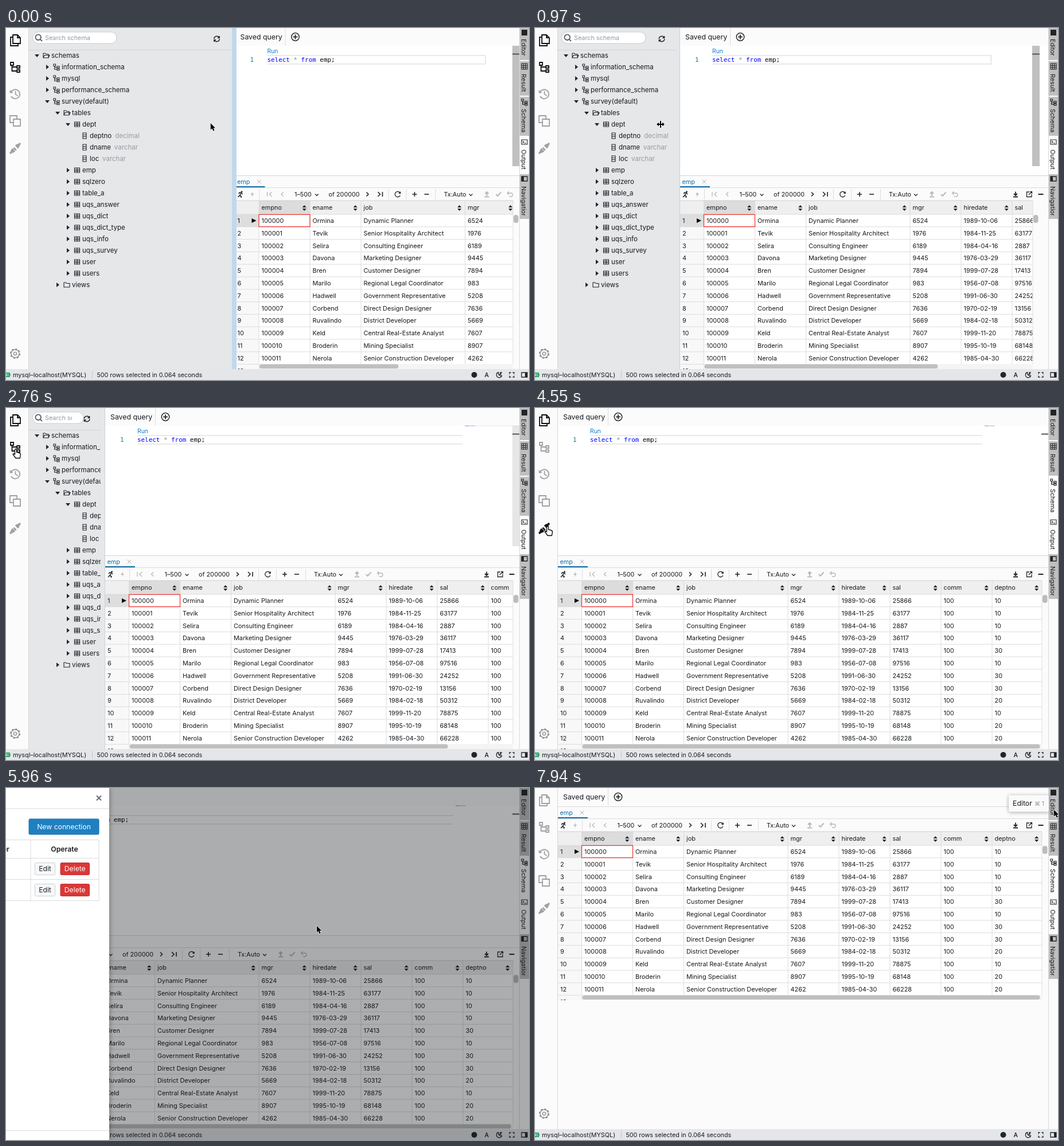
Recreate the animation shown at these times as an HTML page. Size 912 by 614 pixels, loop 8000 ms.

```html
<!DOCTYPE html>
<html lang="en">
<head>
<meta charset="utf-8">
<title>Database workbench</title>
<style>
html, body { margin: 0; width: 100%; height: 100%; overflow: hidden; background: #fbfbfb; }
svg { display: block; width: 912px; height: 614px; }
text { font-family: Inter, "Open Sans", sans-serif; white-space: pre; fill: #16191d; }
.mono { font-family: "DejaVu Sans Mono", monospace; }
</style>
</head>
<body>
<svg id="stage" viewBox="0 0 912 614"></svg>
<script>
const stage = document.getElementById('stage');
const INK = '#20252a', GREY = '#a0a0a0', LINE = '#dcdcdc', PANEL = '#e5e7e9';

const set = (e, a) => { for (const k in a) e.setAttribute(k, a[k]); return e; };
function el(p, tag, a = {}) {
  const e = set(document.createElementNS('http://www.w3.org/2000/svg', tag), a);
  p.append(e);
  return e;
}
const group = (p, a) => el(p, 'g', a);
const rect = (p, x, y, width, height, fill, a) => el(p, 'rect', { x, y, width, height, fill, ...a });
const move = (e, x, y) => set(e, { transform: `translate(${x} ${y})` });
const show = (e, on) => set(e, { visibility: on ? 'visible' : 'hidden' });
function text(p, x, y, s, size, a) {
  const e = el(p, 'text', { x, y, 'font-size': size, ...a });
  e.textContent = s;
  return e;
}
const icon = (p, x, y, d, a) => el(p, 'path', {
  d, transform: `translate(${x} ${y})`, fill: 'none', stroke: INK, 'stroke-width': 1.3, ...a });
const solid = (p, x, y, d, fill = INK) => icon(p, x, y, d, { fill, stroke: 'none' });
const vline = (p, x, y1, y2, stroke = LINE) => icon(p, x, 0, `M0 ${y1}V${y2}`, { stroke, 'stroke-width': 1 });
const hline = (p, x1, x2, y, stroke = LINE) => icon(p, 0, y, `M${x1} 0H${x2}`, { stroke, 'stroke-width': 1 });
const defs = el(stage, 'defs');
function clip(id, x, y, w, h) {
  return rect(el(defs, 'clipPath', { id }), x, y, w, h, '#000');
}
const clipped = (p, id) => group(p, { 'clip-path': `url(#${id})` });

const TREE = 'M-5-5h3.5v3.5h-3.5zM-3.3-1V4.2H.5M-3.3 1H.5M1-1.2h4v2.8h-4zM1 3.2h4v2.6h-4z';
const TABLE = 'M-4.5-4h9v8h-9zM-4.5-1.2h9M-4.5 1.4h9M0-4V4';
const FOLDER = 'M-5 4V-4h3.5l1.3 1.5H4V4zM-5 4L-3-.5H6L4 4';
const DB = 'M-5-6Q0-9 5-6V6Q0 9-5 6ZM-5-6Q0-3 5-6M-5-1.5Q0 1 5-1.5M-5 3Q0 5.5 5 3';
const SYNC = 'M4.3-2A4.8 4.8 0 0 0-4.8 0M-4.3 2A4.8 4.8 0 0 0 4.8 0M4.6-5v3.2H1.4M-4.6 5V1.8h3.2';
const RELOAD = 'M4.3-1.8A4.7 4.7 0 1 0 4.3 1.9M4.7-4.6V-1.6H1.7';
const CHEVRON = 'M-3-1.6L0 1.5 3-1.6';
const CROSS = 'M-3.3-3.3L3.3 3.3M3.3-3.3L-3.3 3.3';

rect(stage, 0, 0, 912, 614, '#fbfbfb');

// editor
const editor = group(stage);
rect(editor, 0, 31, 900, 226, '#fff');
text(editor, 9, 20, 'Saved query', 12.3);
vline(editor, 87.5, 0, 31);
el(editor, 'circle', { cx: 105, cy: 15.5, r: 6.8, fill: 'none', stroke: '#111', 'stroke-width': 1.3 });
icon(editor, 105, 15.5, 'M-4 0H4M0-4V4', { stroke: '#111', 'stroke-width': 1.6 });
text(editor, 56, 44, 'Run', 10.4, { style: 'fill:#0f7dc9' });
text(editor, 26, 59, '1', 10.9, { class: 'mono', style: 'fill:#237893' });
const code = text(editor, 56, 59, '', 10.9, { class: 'mono' });
[['select ', '#00f'], ['* ', '#778899'], ['from ', '#00f'], ['emp;', '#000']].forEach(([s, c]) => {
  el(code, 'tspan', { style: `fill:${c}` }).textContent = s;
});
const current = icon(stage, 0, 0, '', { stroke: '#e2e2e2', 'stroke-width': 1.5 });
const minimap = group(stage);
rect(minimap, 0, 30.5, 8, 1.2, '#8ca4f0');
rect(minimap, 9, 30.5, 9, 1.2, '#a9bbe8');
const trail = rect(minimap, 18, 30.5, 82, 1.2, '#bcd3f2');
const edge = group(stage);
const slider = rect(edge, 883, 31, 13, 210, '#c0c0c0');
rect(edge, 883, 44.5, 13, 2, '#555');

// results
const results = group(stage);
rect(results, 0, 257, 900, 338, '#fbfbfb');
hline(results, 0, 900, 257.5, '#d5d5d5');
text(results, 3.5, 272, 'emp', 10.8, { style: 'fill:#106ba3' });
icon(results, 42, 268, CROSS, { stroke: '#aaa', 'stroke-width': 1 });
hline(results, 0, 900, 278.5);
rect(results, 0, 276, 52, 2, '#106ba3');
const bar = group(results, { transform: 'translate(0 290)' });
icon(bar, 9, 0, 'M1-1L-1 2 2 4 1 6M-1 2L-4 5M-3-1L-1-3 2-2 4 0', { 'stroke-width': 1.6 });
el(bar, 'circle', { cx: 11.5, cy: -4.2, r: 1.5, fill: INK });
solid(bar, 30, 0, 'M1-5L-3 1H0L-1 5 3-1H0Z', '#bbb');
icon(bar, 60, 0, 'M-4-4V4M4-4L0 0 4 4', { stroke: '#b5b5b5' });
icon(bar, 82, 0, 'M2-3.5L-1.5 0 2 3.5', { stroke: '#b5b5b5' });
text(bar, 103.5, 4, '1–500', 10.8);
icon(bar, 142.5, 1, CHEVRON);
text(bar, 163, 3.7, 'of 200000', 10.8);
icon(bar, 231, 0, 'M-2-3.5L1.5 0-2 3.5', { 'stroke-width': 1.6 });
icon(bar, 253, 0, 'M4-4V4M-4-4L0 0-4 4', { 'stroke-width': 1.6 });
icon(bar, 283.5, 0, RELOAD);
icon(bar, 313, 0, 'M-4 0H4M0-4V4', { 'stroke-width': 1.6 });
icon(bar, 334, 0, 'M-4 0H4', { 'stroke-width': 1.6 });
[42, 267, 298, 349].forEach(x => vline(bar, x + .5, -9, 9));
text(bar, 364, 4, 'Tx:Auto', 10.8);
icon(bar, 411, 1, CHEVRON);
icon(bar, 439, 0, 'M0 3V-3M-3-1L0-4 3-1M-4 4.5H4', { stroke: '#b8b8b8', 'stroke-width': 2 });
icon(bar, 459, 0, 'M-4 0L-1.3 3 4.5-3.5', { stroke: '#b8b8b8', 'stroke-width': 2 });
icon(bar, 479, 0, 'M-4-2H2A3 3 0 0 1 2 4H-1M-1.5-5L-4.5-2-1.5 1', { stroke: '#b8b8b8' });

const COLS = 'empno ename job mgr hiredate sal comm deptno'.split(' ');
const STARTS = [41.5, 130.5, 219.5, 401, 490, 579, 668, 757, 844.5];
const ROWS = `Ormina,Dynamic Planner,6524,1989-10-06,25866,10
Tevik,Senior Hospitality Architect,1976,1984-11-25,63177,10
Selira,Consulting Engineer,6189,1984-04-16,2887,10
Davona,Marketing Designer,9445,1976-03-29,36117,10
Bren,Customer Designer,7894,1999-07-28,17413,30
Marilo,Regional Legal Coordinator,983,1956-07-08,97516,10
Hadwell,Government Representative,5208,1991-06-30,24252,30
Corbend,Direct Design Designer,7636,1970-02-19,13156,30
Ruvalindo,District Developer,5669,1984-02-18,50312,20
Keld,Central Real-Estate Analyst,7607,1999-11-20,78875,10
Broderin,Mining Specialist,8907,1995-10-19,68148,20
Nerola,Senior Construction Developer,4262,1985-04-30,66228,20`.split('\n');
const PITCH = 21.8, TOP = 325, CELL = 10.9;

const gridClip = clip('grid', 0, 300, 800, 295);
const grid = clipped(results, 'grid');
rect(grid, 0, 301, 860, 294, '#fff');
rect(grid, 0, 301, 844.5, 24, '#efefef');
rect(grid, 41.5, 301, 89, 24, '#dcdcdc');
rect(grid, 0, 325, 41.5, 270, '#f8f8f8');
rect(grid, 0, 325, 41.5, PITCH, '#dedede');
COLS.forEach((name, i) => {
  text(grid, STARTS[i] + 4.5, 317, name, CELL);
  solid(grid, STARTS[i + 1] - 9.8, 314, 'M-3.6-1L0-5 3.6-1ZM-3.6 1L0 5 3.6 1Z');
});
STARTS.forEach(x => vline(grid, x, 301, 595));
hline(grid, 0, 860, 301, '#cfcfcf');
for (let i = 0; i <= 12; i++) {
  const y = TOP + i * PITCH;
  hline(grid, 0, 844.5, y);
  text(grid, 4, y + 14.9, i + 1, CELL);
  if (i > 11) continue;
  const [name, job, mgr, hired, sal, dept] = ROWS[i].split(',');
  [100000 + i, name, job, mgr, hired, sal, 100, dept].forEach((v, c) =>
    text(grid, STARTS[c] + 4.5, y + 14.9, v, CELL));
}
solid(grid, 33, 336, 'M-4-4L4 0-4 4Z', '#000');
rect(grid, 41.5, 325.3, 89, 21.3, 'none', { stroke: '#f02c2c', 'stroke-width': 1.2 });
rect(grid, 41.5, 586, 830, 9, '#f4f4f4');
const hbar = rect(results, 42.5, 586.5, 100, 7.5, '#bfbfbf', { rx: 3.5 });
const vbar = group(results);
rect(vbar, 0, 301, 12, 294, '#fbfbfb');
vline(vbar, 0, 301, 586);
rect(vbar, 1, 326, 8.5, 14, '#bcbcbc', { rx: 4 });
const tools = group(stage);
icon(tools, 838, 290, 'M0-4.5V2M-3-1L0 2 3-1M-4 4.5H4', { 'stroke-width': 1.8 });
icon(tools, 862, 290, 'M0-4H-4.5V4.5H4V0M1-4.5H4.5V-1M4.5-4.5L-1 1');
icon(tools, 882, 290, 'M-4.5 0H4.5', { 'stroke-width': 2 });
const below = rect(stage, 40, 371, 856, 224, '#fbfbfb');

// schema tree
const side = group(stage);
const sideBg = rect(side, 40, 0, 360, 595, PANEL);
const gripLine = vline(side, 0, 0, 595, '#cfd3d6');
const grip = rect(side, 0, 0, 8, 595, '#c1d8ec');
const headLine = hline(side, 40, 400, 38.5, '#d2d5d8');
const field = rect(side, 46.5, 7, 146, 20, '#fff', { rx: 10, stroke: '#c9cdd1' });
icon(side, 57, 17, 'M2.7 2.7L6 6M4-.8A4.8 4.8 0 1 1-5.6-.8A4.8 4.8 0 1 1 4-.8Z', { stroke: '#4f5b68', 'stroke-width': 1.8 });
const hintClip = clip('hint', 60, 0, 120, 40);
text(clipped(side, 'hint'), 68, 21, 'Search schema', 10.8, { style: 'fill:#8f99a5' });
const reload = icon(side, 0, 19, SYNC, { 'stroke-width': 1.5 });
const treeClip = clip('tree', 40, 39, 350, 556);
const tree = clipped(side, 'tree');
const NODES = `0-d schemas|1+s information_schema|1+s mysql|1+s performance_schema|1-s survey(default)|2-d tables|3-t dept|
4 c deptno:decimal|4 c dname:varchar|4 c loc:varchar|3+t emp|3+t sqlzero|3+t table_a|3+t uqs_answer|3+t uqs_dict|
3+t uqs_dict_type|3+t uqs_info|3+t uqs_survey|3+t user|3+t users|2+d views`.replace(/\n/g, '').split('|');
const NODE_ICON = { d: FOLDER, s: TREE, t: TABLE, c: 'M-3-5h6v10h-6zM-3-1.5h6M-3 1.5h6' };
NODES.forEach((node, i) => {
  const depth = +node[0], y = 48 + i * 20;
  const x = depth < 4 ? 54 + depth * 18 : 121;
  if (node[1] === '-') solid(tree, x, y, 'M-4-2H4L0 3Z');
  if (node[1] === '+') solid(tree, x, y, 'M-2-4V4L3 0Z');
  icon(tree, x + 16, y, node === NODES[20] ? 'M-5 4V-4h3.5l1.3 1.5H5V4z' : NODE_ICON[node[2]], { 'stroke-width': 1.1 });
  const [name, type] = node.slice(4).split(':');
  const label = text(tree, x + 25, y + 4.2, name, 11.5);
  if (type) el(label, 'tspan', { dx: 6, style: 'fill:#969da4' }).textContent = type;
});

// activity strip
rect(stage, 0, 0, 39, 595, '#fbfbfb');
vline(stage, 39.5, 0, 595, '#d4d6d8');
const STRIP = [
  [21, 'M-4-9H4L9-4V6H-4ZM4-9V-4H9M-4-5H-8V10H5V6'],
  [68, 'M-8-8h5v5h-5zM-5.5-3V7H2M-5.5 0H2M3-2h5v4h-5zM3 5h5v4h-5z'],
  [115, 'M-7.2-3A8 8 0 1 1-7 4M-8.5-6.5V-2.5H-4.5M.5-5V.5L4.5 3'],
  [162, 'M-3-3H9V9H-3ZM-3 3H-9V-9H3V-3'],
  [210, 'M1-6L6-1M3-7L7-3M5-5L9-9M-6 1L-1 6M-7 3L-3 7M-5 5L-9 9M-2.5 1L-.5-1M-.5 3L1.5 1']
];
const strip = STRIP.map(([y, d], i) => icon(stage, 16, y, d, { 'stroke-width': i === 4 ? 3.4 : 1.8 }));
el(stage, 'circle', { cx: 16, cy: 568, r: 7, fill: 'none', stroke: '#8c8c8c', 'stroke-width': 1.3 });
el(stage, 'circle', { cx: 16, cy: 568, r: 8.2, fill: 'none', stroke: '#8c8c8c', 'stroke-width': 1.8, 'stroke-dasharray': '3.22 3.22' });
el(stage, 'circle', { cx: 16, cy: 568, r: 2.7, fill: 'none', stroke: '#8c8c8c', 'stroke-width': 1.3 });

// right tabs
rect(stage, 896, 0, 16, 595, '#fbfbfb');
vline(stage, 895.5, 0, 595, '#dadada');
clip('tabs', 896, 0, 16, 327);
const TABS = [['Editor', 0, 56], ['Result', 58, 60], ['Schema', 120, 68], ['Output', 190, 62], ['Navigation', 255, 78]];
const tabBg = TABS.map(([name, y, h], i) => {
  const bg = rect(stage, 896, y, 16, h, i === 3 ? '#fbfbfb' : '#bfbfbf');
  text(clipped(stage, 'tabs'), 0, 0, name, 10.8, { transform: `translate(899.2 ${[19, 80, 141, 212, 276][i]}) rotate(90)` });
  return bg;
});
rect(stage, 899, 3, 10, 10, INK);
icon(stage, 904, 67, 'M-5-5H5V5H-5ZM-5-1.5H5M-5 1.8H5M-1.7-5V5M1.7-5V5', { 'stroke-width': 1.1 });
icon(stage, 904, 129, TREE, { 'stroke-width': 1.2 });
icon(stage, 904, 199, 'M-5-4H5V4H-5ZM-3-2L-1 0-3 2M0 2H3', { 'stroke-width': 1.1 });
icon(stage, 904, 263, 'M-5-4H5V4H-5Z');
rect(stage, 899, 259, 4, 8, INK);

// status bar
rect(stage, 0, 595, 912, 19, '#e4e6e9');
icon(stage, 3, 605, 'M-4-3H3V3H-4M-2 0H5', { stroke: '#23a066', 'stroke-width': 1.8 });
text(stage, 12, 609, 'mysql–localhost(MYSQL)', 10.8);
vline(stage, 150.5, 598, 611, '#c3c6c9');
text(stage, 158.5, 609, '500 rows selected in 0.064 seconds', 10.7);
el(stage, 'circle', { cx: 816.5, cy: 605, r: 5, fill: INK });
text(stage, 834.5, 609, 'A', 10.5, { 'font-weight': 500 });
icon(stage, 860, 605, 'M-1-4.5A4.7 4.7 0 1 0 4.5 1.5A4.5 4.5 0 0 1-1-4.5M1-4H4L1-1H4');
icon(stage, 882, 605, 'M-4-1.5V-4H-1.5M1.5-4H4V-1.5M4 1.5V4H1.5M-1.5 4H-4V1.5');
icon(stage, 904, 605, 'M-5-4H5V4H-5Z');
rect(stage, 905, 601, 4, 8, INK);

// tooltip
function tip(name, key, x, y) {
  const g = group(stage, { style: 'filter:drop-shadow(0 1px 3px rgba(0,0,0,.35))' });
  rect(g, x, y - 14.5, 896 - x, 29, '#fafafa', { rx: 2 });
  text(g, x + 7, y + 4.3, name, 12.3);
  text(g, 871, y + 4, '⌘ ' + key, 10, { style: 'fill:#8c949c;font-family:Inter,"DejaVu Sans",sans-serif' });
  return g;
}
const navTip = tip('Navigation', 5, 797, 294);
const editTip = tip('Editor', 1, 826, 27);

// connections drawer
const shade = rect(stage, 0, 0, 912, 614, '#111418');
const drawer = group(stage);
rect(drawer, 0, 0, 456, 614, '#fff', { style: 'filter:drop-shadow(0 0 5px rgba(0,0,0,.4))' });
icon(drawer, 24, 18, DB, { stroke: '#5f6b7c', 'stroke-width': 1.8 });
solid(drawer, 28, 21, 'M1-6L-4 1H-1L-2 6 4-1H1Z', '#5f6b7c');
text(drawer, 42, 23.2, 'Connections', 15.4, { 'font-weight': 600 });
icon(drawer, 438, 17.5, 'M-4-4L4 4M4-4L-4 4', { stroke: '#5f6b7c', 'stroke-width': 1.9 });
hline(drawer, 0, 456, 36);
hline(drawer, 0, 456, 597.5);
function button(x, y, w, h, label, fill, stroke, ink) {
  rect(drawer, x, y, w, h, fill, { rx: 2, stroke });
  text(drawer, x + w / 2, y + h / 2 + 4.4, label, 12.2, { 'text-anchor': 'middle', style: `fill:${ink}` });
}
button(316, 54, 122, 27, 'New connection', '#1f80c1', '#1a6ea8', '#fff');
icon(drawer, 0, 0, 'M15 90.5H438V196.5H15ZM15 122.5H438M15 159.5H438M210 90.5V196.5M319 90.5V196.5', { stroke: '#d9dbdd', 'stroke-width': 1 });
[['Name', 112], ['Driver', 264], ['Operate', 378]].forEach(([s, x]) =>
  text(drawer, x, 110.6, s, 12.2, { 'font-weight': 600, 'text-anchor': 'middle' }));
[['velmor-local', 'VELMOR', 141], ['mysql-localhost', 'MYSQL', 178]].forEach(([name, driver, y]) => {
  text(drawer, 22.5, y + 4.4, name, 12.3);
  text(drawer, 218, y + 4.4, driver, 12.2);
  button(326.5, y - 10.5, 35, 21, 'Edit', '#f7f8f9', '#cbced1', INK);
  button(371, y - 10.5, 50.5, 21, 'Delete', '#db3737', '#c62f2f', '#fff');
});

// pointers
const pointer = group(stage);
const SHAPES = {
  A: 'M0 0V11.5L2.7 9.2 4.6 13.6 6.7 12.7 4.8 8.5H8.3Z',
  H: 'M-1.5 1.5Q0-1 1.5 1.5V6L6 7.2Q8.7 8.2 8.3 11L7.3 16.5H0L-4.8 10Q-4.5 7.5-1.5 10Z',
  W: 'M-7 0L-3-3.5V-1H-1V-6H1V-1H3V-3.5L7 0 3 3.5V1H1V6H-1V1H-3V3.5Z',
  I: 'M-3-7Q0-7 0-5.5Q0-7 3-7M0-5.5V5.5M-3 7Q0 7 0 5.5Q0 7 3 7M-1.5 0H1.5'
};
const pointers = {};
for (const k in SHAPES) {
  const dark = k === 'A' || k === 'W';
  pointers[k] = icon(pointer, 0, 0, SHAPES[k], {
    fill: { H: '#fff', I: 'none' }[k] || '#000', stroke: dark ? '#fff' : '#000',
    'paint-order': dark ? 'stroke' : 'normal', 'stroke-linejoin': 'round' });
}

// motion: [time, x, y, shape], [time, split], [time, drawer edge, shade]
const PATH = [
  [0, 357, 166, 'A'], [88, 346, 167, 'W'], [882, 226, 167, 'W'], [970, 219, 168, 'W'], [1770, 122, 167, 'W'],
  [1850, 110, 160, 'A'], [2430, 24, 80, 'H'], [2500, 17, 71, 'H'], [3150, 17, 71, 'H'], [4020, 21, 126, 'H'],
  [4110, 22, 130, 'H'], [4490, 22, 206, 'H'], [4890, 21, 207, 'A'], [5400, 21, 207, 'A'], [5650, 542, 239, 'A'],
  [5960, 542, 241, 'I'], [6140, 542, 241, 'I'], [6400, 735, 258, 'A'], [6630, 905, 277, 'A'],
  [6800, 905, 291, 'A'], [7000, 905, 291, 'A'], [7520, 905, 38, 'A'], [8000, 905, 38, 'A']];
const SPLIT = [[2, 399.5], [882, 269], [970, 253], [1410, 185], [1850, 173], [8000, 173]];
const DRAWER = [[0, 0, 0], [4900, 120, .25], [4990, 380, .55], [5080, 442, .68], [5200, 456, .7],
  [5880, 180, .35], [5970, 0, .12], [6050, 0, 0]];
const FADE = [[0, 1], [2640, .7], [2760, .4], [3030, 0], [5970, .6], [6100, 1], [6480, .6], [6570, .3], [6660, 0]];

const held = (keys, t) => keys.filter(k => k[0] <= t).pop() || keys[0];
function mix(keys, t, i) {
  const a = held(keys, t), b = keys[keys.indexOf(a) + 1];
  return b && t > a[0] ? a[i] + (b[i] - a[i]) * (t - a[0]) / (b[0] - a[0]) : a[i];
}

function draw(t) {
  const beat = Math.floor(t / 88) * 88 + 2;
  const open = t < 3030, folded = t >= 7830;
  const split = open ? mix(SPLIT, beat, 1) : 40;
  // panes resize one beat after the splitter
  const lag = open ? mix(SPLIT, beat - 88, 1) - split : t < 3090 ? 133 : 0;
  const right = 896 - lag, lift = folded ? -225 : 0;

  move(editor, split, 0);
  const d = right - split - 497;
  const end = right - 60 - .21 * d + .00015 * d * d;
  const wide = split < 200;
  set(current, { d: `M${split + 56.5} 48H${end}${wide ? 'M' + end + ' 62.7' : 'V62.7'}H${split + 56.5}` });
  move(minimap, end + 4, 0);
  show(minimap, wide && !folded);
  move(edge, -lag, 0);
  const opacity = held(FADE, t)[1];
  set(slider, { opacity });
  set(trail, { opacity });

  move(results, split, lift);
  move(tools, 0, lift);
  show(tools, split < 340);
  show(below, folded);
  const width = right - split - 12;
  set(gridClip, { width });
  set(hbar, { width: Math.min(803, (width - 43.5) ** 2 / 803) });
  move(vbar, width, 0);

  show(side, open);
  if (open) {
    const searchEnd = Math.min(193, split - 38);
    set(sideBg, { width: split - 40 });
    set(grip, { x: split - 5.5, opacity: t < 500 ? 1 : 0 });
    move(gripLine, split - .5, 0);
    set(headLine, { d: `M40 0H${split - 6}` });
    set(field, { width: searchEnd - 46.5 });
    set(hintClip, { width: searchEnd - 80 });
    move(reload, split - 32, 19);
    set(treeClip, { width: split - 48 });
  }

  const x = mix(PATH, beat, 1), y = mix(PATH, beat, 2), shape = held(PATH, beat)[3];
  move(pointer, x, y);
  for (const k in pointers) show(pointers[k], k === shape);
  strip.forEach((e, i) => {
    const hover = t < 4900 && x < 34 && Math.abs(y - STRIP[i][0]) < 16;
    const on = hover || (i === 0 && !folded) || (i === 1 && open);
    set(e, { stroke: on ? '#111' : GREY });
  });
  set(tabBg[2], { fill: open ? '#bfbfbf' : '#fbfbfb' });
  show(navTip, t >= 6990 && t < 7200);
  show(editTip, t >= 7440);

  const [, reach, dim] = held(DRAWER, t);
  set(shade, { opacity: dim });
  move(drawer, reach - 456, 0);
  show(drawer, reach > 0);
}

const start = performance.now();
function tick() {
  draw((performance.now() - start) % 8000);
  requestAnimationFrame(tick);
}
tick();
</script>
</body>
</html>
```
